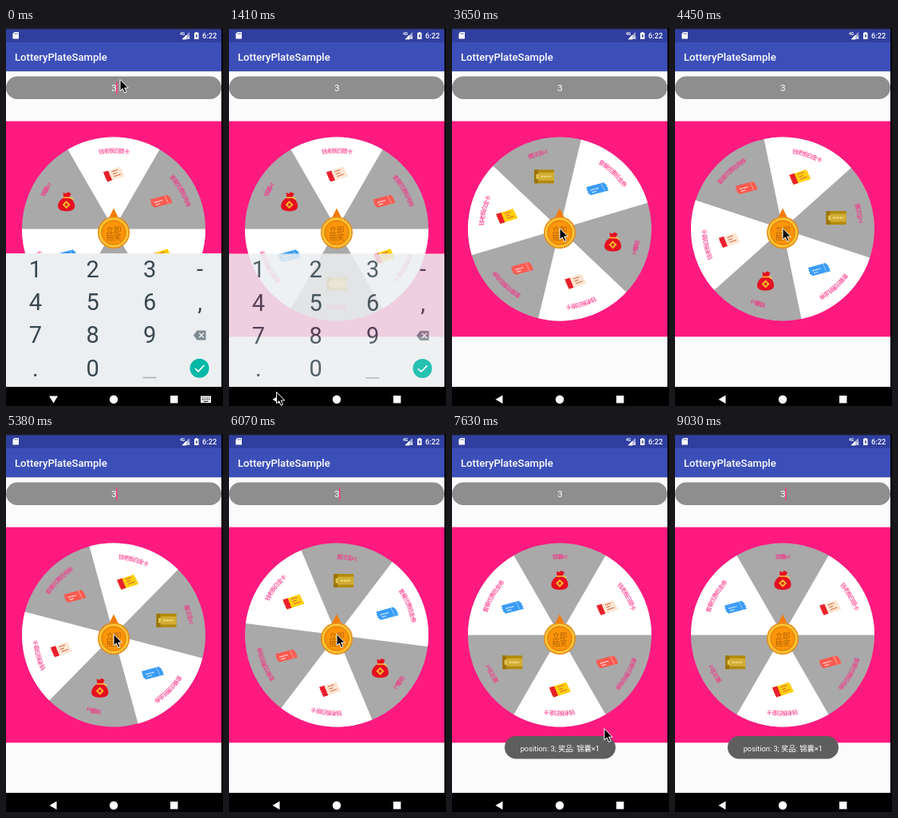
Animation of 272x473 px, one loop 9.13 s. Source, as an HTML page:

```html
<!DOCTYPE html>
<html lang="zh">
<head>
<meta charset="utf-8">
<title>LotteryPlateSample</title>
<style>
html, body { margin: 0; height: 100%; overflow: hidden; background: #000; }
svg { display: block; width: 100vw; height: 100vh; font-family: Roboto, "Noto Sans CJK SC", "Noto Sans CJK", sans-serif; }
.prize { font-size: 7.4px; letter-spacing: -1.2px; fill: #ff2480; }
.mid { text-anchor: middle; }
</style>
</head>
<body>
<svg viewBox="0 0 272 473" preserveAspectRatio="none">
  <defs>
    <path id="arc" d="M-95.3 0A95.3 95.3 0 0 1 95.3 0"/>
    <g id="pass">
      <path d="M-13-2.5 8-9.5 14 2.5-8 9.5Z"/>
      <path d="M-13.5-2.5-7-4.6-2 7.6-8 9.5-8.4 7.6-9.8 6.8-9.6 4.8-11 3.9-10.8 2-12.2 1-12-.7Z" fill="#e8202c"/>
      <path d="M-2.5-3.2 5-5.7M-1-.2 4-1.9M.5 2.7 9-.2" stroke="#d9603a" fill="none"/>
    </g>
    <g id="coupon">
      <path d="M-14-2.5 8-8.5 10-6.4 11.6-5.6 11.6-3.4 13.3-2.2 13 0 14.5 1.6-8.5 7.6-10 5.8-11.8 5-11.6 2.8-13.2 1.6-12.7-.6Z"/>
      <path d="M-8.5 1.2 2-1.6M-6.5 4-1 2.5" stroke="#fff" stroke-width="1.4" stroke-dasharray="2 .6" opacity=".8"/>
      <path d="M5-6.8 9.5 2.6" stroke="#fff" stroke-width=".8" stroke-dasharray="1.5 1"/>
    </g>
    <g id="gold">
      <path d="M-12.5-8.5h25v17h-25z" fill="#b28a08"/>
      <path d="M-12.5-5h25v10h-25z" fill="#d2ad35"/>
      <path d="M-12.5-8.5h5v17h-5z" fill="#9a7405"/>
      <path d="M-10-3h3v6h-3z" fill="#e4c85a"/>
      <path d="M-4 0H9" stroke="#f0dc86" stroke-width="2" stroke-dasharray="3 1"/>
    </g>
    <g id="bag">
      <path d="M-4-11.5-1-10 2-12 6-10 3.5-5C8-3 11 2 10.5 6.5 10 11 4 12 0 12S-10 11-10.5 6.5C-11 2-7.5-3-3.5-5Z" fill="#e50f20"/>
      <path d="M-4-5H4.5L8.5-3" stroke="#ffc63a" stroke-width="1.5" fill="none"/>
      <path d="M0-.8 4.6 3.8 0 8.4-4.6 3.8Z" fill="#f6b02c" stroke="#f6b02c" stroke-linejoin="round"/>
      <path d="M-1.5 2.3h3v3h-3z" fill="#d42018"/>
    </g>
  </defs>

  <rect width="270" height="450" fill="#fbfbfb"/>
  <rect width="270" height="18" fill="#303f9f"/>
  <rect width="272" height="1.5" fill="#1c2030"/>
  <rect y="18" width="270" height="36" fill="#3c4fb9"/>
  <rect y="54" width="270" height="1" fill="#c9cbd6"/>
  <path d="M10.5 5H16v8.500H8.500V7Z" fill="#fff"/>
  <path d="M11 6.2v1.6M12.7 6.2v1.6M14.3 6.2v1.6" stroke="#303f9f" stroke-width=".8"/>
  <text x="218" y="9" font-size="5" font-weight="700" fill="#fff">4G</text>
  <path d="M230 5v9h-9Z" fill="#fff" opacity=".55"/>
  <path d="M221 14 226 9V14ZM227.5 10.5l3 3m0-3-3 3" fill="#fff" stroke="#fff" stroke-width=".8"/>
  <path d="M236 6h1.5V5h2.500v1h1.500v8H236Z" fill="#fff"/>
  <path d="M239.3 7 237.4 10.4H238.6V13L240.4 9.4H239.3Z" fill="#303f9f"/>
  <text x="246" y="13" font-size="9.2" font-weight="500" fill="#fff">6:22</text>
  <text x="11" y="40.8" font-size="13.1" font-weight="500" fill="#fff">LotteryPlateSample</text>

  <rect y="60.5" width="270" height="28.5" rx="14.25" fill="#8e8e8e"/>
  <text class="mid" x="135.3" y="79.3" font-size="11.8" fill="#fff">3</text>
  <rect id="caret" x="138" y="67" width="1.6" height="16" fill="#ff4081"/>

  <rect y="116.6" width="270" height="269.7" fill="#ff1a80"/>
  <g transform="translate(135 251.5)">
    <g id="wheel"><circle r="115" fill="#a9a9a9"/></g>
    <g id="icons"></g>
    <path d="M0-26 7-12H-7Z" fill="#f57c0a"/>
    <g transform="translate(0 4.5)">
      <circle r="20" fill="#e5860a"/>
      <circle r="17.3" fill="#f79a10" stroke="#ffd84a" stroke-width="1.6"/>
      <circle r="18.7" fill="none" stroke="#ffe27a" stroke-width=".9" stroke-dasharray="1 2"/>
      <circle r="14.5" fill="#ff950a" stroke="#d97f0c" stroke-width=".8"/>
      <g class="mid" font-size="9.6" font-weight="300" fill="#b06405">
        <text y="-.2">立即</text><text y="9.4">抽奖</text>
      </g>
    </g>
  </g>

  <g id="toast">
    <rect x="66" y="378" width="139" height="28.5" rx="14.25" fill="#5e5e5e"/>
    <text class="mid" x="135.3" y="396.6" font-size="9.3" fill="#fff">position: 3; 奖品: 锦囊×1</text>
  </g>

  <g id="keyboard">
    <rect y="282" width="270" height="168" fill="#eceff1"/>
    <g id="keys" class="mid" font-size="29" fill="#37474f"></g>
    <path d="M171.500 437.500h17" stroke="#a9b3b8" stroke-width="1.6"/>
    <path d="M235 384.500 239.500 378.500H250.500V390.500H239.500Z" fill="#7d8a91"/>
    <path d="M242 381.500l6 6m0-6-6 6" stroke="#eceff1" stroke-width="1.5"/>
    <circle cx="242.5" cy="425.7" r="12" fill="#00b8a5"/>
    <path d="M237 426 241 429.700 248.500 422" fill="none" stroke="#fff" stroke-width="1.7"/>
  </g>

  <path d="M0 449H272V473H0ZM270 0h2v473h-2z" fill="#000"/>
  <g fill="#fff">
    <path id="back" d="M54.5 464.7 63.5 459.5V470Z"/>
    <g id="imeNav">
      <path d="M54 460.500H65L59.500 469.500Z"/>
      <path d="M244 460.500h13v8.500h-13z"/>
      <path d="M245.500 462.700h10M245.500 464.900h10" stroke="#000" stroke-width="1.1" stroke-dasharray="1.2 1"/>
      <path d="M247.500 467.300h6" stroke="#000"/>
    </g>
    <circle cx="135" cy="464.7" r="5.2"/>
    <rect x="206" y="460" width="9.4" height="9.4"/>
  </g>
  <path id="mouse" d="M0 0V14.3L3.3 11.3 5.6 16.7 8 15.6 5.7 10.5H10.3Z" fill="#000" stroke="#fff"/>
</svg>

<script>
const LOOP = 9130, TURN = 3660, BLINK = 502;
const $ = id => document.getElementById(id);
const clamp = x => Math.min(1, Math.max(0, x));

// Prizes clockwise from the top: label, icon, fill
const prizes = [
  ['钱老板白银卡', 'pass', '#fbe6d2'],
  ['套餐优惠抵用券', 'coupon', '#fb5a50'],
  ['钱老板白金卡', 'pass', '#ffcf0a'],
  ['魔法宝×1', 'gold', ''],
  ['套餐优惠抵金券', 'coupon', '#3a9cf5'],
  ['锦囊×1', 'bag', ''],
];
prizes.forEach(([label, icon, fill], i) => {
  const slice = i % 2 ? '' : '<path d="M0 0-57.5-99.6A115 115 0 0 1 57.5-99.6Z" fill="#fff"/>';
  $('wheel').innerHTML += `<g transform="rotate(${i * 60})">${slice}
    <text class="prize mid"><textPath href="#arc" startOffset="50%">${label}</textPath></text></g>`;
  $('icons').innerHTML += `<use href="#${icon}" fill="${fill}"/>`;
});
['123-', '456,', '789', '.0'].forEach((row, r) => [...row].forEach((key, c) => {
  $('keys').innerHTML += `<text x="${[36.8, 108.7, 180.2, 243][c]}" y="${312 + r * 41.2}">${key}</text>`;
}));

// The screen refreshes in even steps: [end of span, steps in it]
const beats = [[180, 1], [1050, 14], [1170, 2], [1410, 1], [2150, 13], [2390, 1], [2560, 3],
  [3360, 13], [3650, 5], [4280, 11], [4450, 3], [5200, 13], [5380, 3], [6130, 13],
  [6830, 12], [7050, 4], [7920, 15], [8090, 3], [8450, 1], [9030, 1], [LOOP, 1]];
function held(t) {
  let a = 0;
  for (const [b, n] of beats) {
    if (t < b) return a + Math.floor((t - a) / (b - a) * n) * (b - a) / n;
    a = b;
  }
  return a;
}

// Keys are [time, ...values]; ease shapes each span
function track(keys, t, ease = x => x) {
  let a = keys[0];
  for (const b of keys) {
    if (t < b[0]) {
      const k = ease(clamp((t - a[0]) / (b[0] - a[0] || 1)));
      return a.slice(1).map((v, i) => v + (b[i + 1] - v) * k);
    }
    a = b;
  }
  return a.slice(1);
}
const smooth = x => (1 - Math.cos(Math.PI * x)) / 2;
const spin = [[2473, 0], [2560, .0182], [3650, .2469], [4450, .4134], [5380, .6035], [6830, .907], [7276, 1]];
const pointer = [[0, 143, 64.5], [150, 143, 64.5], [1050, 59.5, 453], [1170, 59.5, 455.5], [1410, 59.5, 455.5],
  [2150, 135, 250.5], [7300, 135, 250.5], [7920, 236.5, 465], [8090, 236.5, 476]];

function draw(now) {
  const t = held(now % LOOP);
  const angle = TURN * smooth(track(spin, t)[0]);
  $('wheel').setAttribute('transform', `rotate(${angle})`);
  [...$('icons').children].forEach((icon, i) => {
    const a = (angle + i * 60) * Math.PI / 180;
    icon.setAttribute('transform', `translate(${68.5 * Math.sin(a)} ${-68.5 * Math.cos(a)})`);
  });
  $('mouse').setAttribute('transform', `translate(${track(pointer, t, smooth)})`);
  $('caret').style.opacity = Math.floor((t - 2390) / BLINK) & 1;

  const hide = clamp((t - 1380) / 200);
  $('keyboard').setAttribute('transform', `translate(0 ${17 * hide * hide})`);
  $('keyboard').style.opacity = 1 - hide;
  $('imeNav').style.opacity = +(t < 1410);
  $('back').style.opacity = +(t >= 1410);
  $('toast').style.opacity = clamp((t - 7330) / 300);
}
function tick() {
  draw(performance.now());
  requestAnimationFrame(tick);
}
tick();
</script>
</body>
</html>
```
